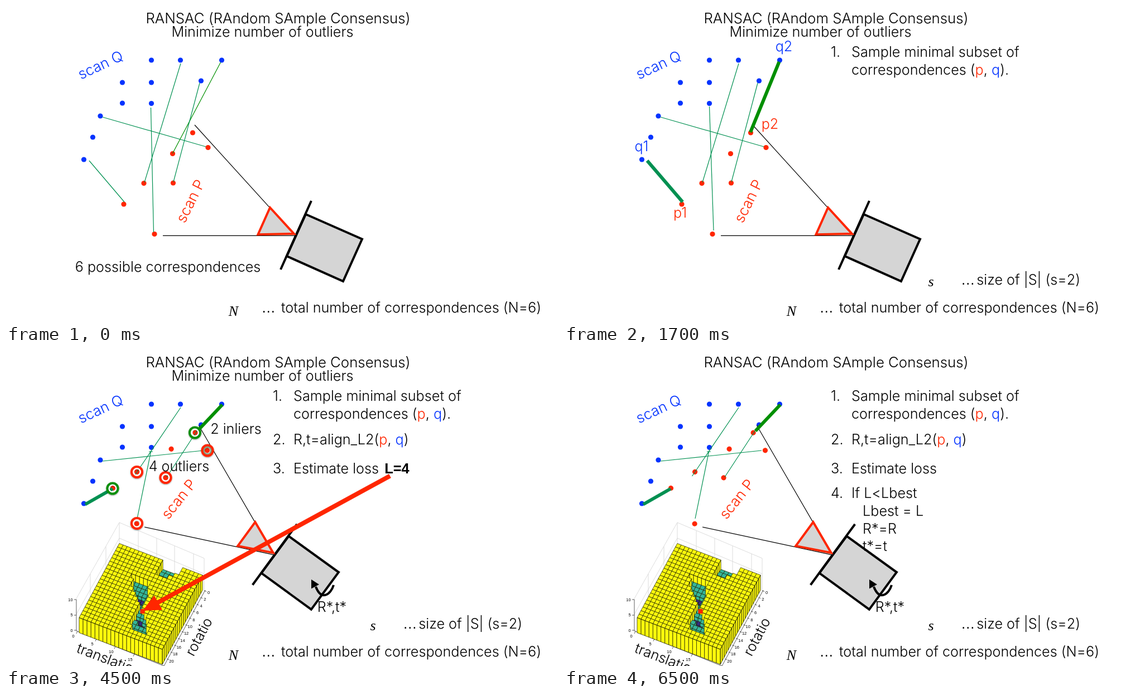
An HTML page for the animation above (8000 ms loop, 989 by 566 pixels).

```html
<!DOCTYPE html>
<html lang="en">
<head>
<meta charset="utf-8">
<title>RANSAC</title>
<style>
html, body { margin: 0; width: 100%; height: 100%; overflow: hidden; background: #fff; }
svg { display: block; width: 989px; height: 566px; }
text {
  font: 300 25.2px Inter, "Open Sans", sans-serif;
  font-optical-sizing: none; font-feature-settings: "calt" 0;
  fill: #000; white-space: pre;
}
text.title { font-size: 25.8px; }
text.scan { font-size: 26.2px; }
text.math { font: italic 26px "Liberation Serif", serif; }
text.tick { font: 7.5px "Liberation Sans", sans-serif; }
text.more { font: 25.5px "Liberation Sans", sans-serif; }
.bold { font: bold 25.4px "Liberation Sans", sans-serif; }
.red { fill: #ff2600; }
.blue { fill: #0433ff; }
</style>
</head>
<body>
<svg id="stage" viewBox="0 0 989 566">
  <defs>
    <filter id="shade" x="-30%" y="-30%" width="160%" height="170%">
      <feDropShadow dx="0" dy="1" stdDeviation="1" flood-opacity=".4"/>
    </filter>
  </defs>
</svg>
<script>
const RED = '#ff2600', BLUE = '#0433ff', SEA = '#009051', GREEN = '#008f00';
const STARTS = [0, 500, 2500, 4500, 6500], LOOP = 8000;
const stage = document.getElementById('stage');
const staged = [];

function add(parent, tag, attrs, html) {
  const el = document.createElementNS('http://www.w3.org/2000/svg', tag);
  for (const k in attrs) el.setAttribute(k, attrs[k]);
  if (html !== undefined) el.innerHTML = html;
  parent.appendChild(el);
  return el;
}
// A group that is visible only during the listed steps.
function layer(steps) {
  const el = add(stage, 'g', {});
  staged.push({ el, steps });
  return el;
}
const text = (g, x, y, s, attrs = {}) => add(g, 'text', { x, y, ...attrs }, s);
const path = (g, d, stroke, width, fill = 'none') =>
  add(g, 'path', { d, stroke, 'stroke-width': width, fill });
const dots = (g, list, fill) =>
  list.forEach(([cx, cy]) => add(g, 'circle', { cx, cy, r: 4.6, fill }));
const tilted = (g, x, y, angle, s, attrs = {}) =>
  add(g, 'text', { transform: `translate(${x} ${y}) rotate(${angle})`, ...attrs }, s);
const MID = { 'text-anchor': 'middle' }, END = { 'text-anchor': 'end' };

// Loss surface as a 3D bar chart
const CELLS = 21, UNIT = 5.4;

function barHeight(i, j) {
  const notchEnd = [15, 15, 14, 13][j];
  if (i >= 11 && i <= notchEnd) return j ? 2.3 : 1.9;
  if (j < 6 || j > 18) return 5;
  // An hourglass valley, narrowest at row 12, with a deep core in each half.
  const off = Math.abs(i - 8 - (j - 6) * 0.47);
  const away = Math.abs(j - 12);
  if (off > 0.6 + 0.42 * Math.min(away, 4)) return 5;
  return off < 0.9 && (away === 2 || away === 3) ? 1.6 : 2.7;
}

function drawPlot(g) {
  const point = (i, j, h) =>
    `${(203 + i * 7.1 - j * 3.43).toFixed(1)} ${(346.5 + i * 2.7 + j * 6.33 + (5 - h) * UNIT).toFixed(1)}`;
  path(g, 'M125 447L203 309L355 373M203 309V347M237 324V360M270 337V374M302 351V400M336 365V400' +
    'M355 373V430M125 475L203 337L355 401M179 352V392M151 401V442', '#d4d4d4', 0.8);
  path(g, 'M126 447V503L283 566L357 430M122 447h4M122 475h4M122 502h4', '#333', 0.8);
  for (let j = 0; j < CELLS; j++) for (let i = 0; i < CELLS; i++) {
    const h = barHeight(i, j), I = i + 1, J = j + 1;
    const fill = h > 4 ? '#fffb0c' : h > 1.8 ? '#35b59b' : '#352a87';
    const face = (...p) => 'M' + p.join('L') + 'Z';
    let d = '';
    if (J === CELLS || barHeight(i, J) < h)
      d += face(point(i, J, h), point(I, J, h), point(I, J, 0), point(i, J, 0));
    if (I === CELLS || barHeight(I, j) < h)
      d += face(point(I, j, h), point(I, J, h), point(I, J, 0), point(I, j, 0));
    d += face(point(i, j, h), point(I, j, h), point(I, J, h), point(i, J, h));
    path(g, d, '#222400', 0.75, fill);
  }
  const tick = (x, y, n) => text(g, x, y, n, { class: 'tick', ...MID });
  for (let k = 0; k < 3; k++) tick(k === 2 ? 115.5 : 117.5, 504.5 - k * 27.3, k * 5);
  for (let k = 0; k < 4; k++) {
    tick(120.5 + k * 34, 515 + k * 14, k * 5);
    path(g, `M${128 + k * 34} ${504 + k * 13.6}l-2 4`, '#333', 0.8);
  }
  for (let k = 0; k <= 10; k++) {
    tick(363 - k * 6.65, 436.5 + k * 12.3, k * 2);
    path(g, `M${355 - k * 6.7} ${431 + k * 12.2}l4 1.6`, '#333', 0.8);
  }
  tilted(g, 125, 541, 21, 'translation');
  tilted(g, 336, 550, -62, 'rotatio');
  add(g, 'rect', { x: 240.5, y: 464, width: 8, height: 8, fill: RED });
}
drawPlot(layer([3, 4]));

// Fixed scan
dots(stage, [[260.5, 97], [312.5, 97], [386.5, 97], [349.5, 134], [208.5, 137], [260.5, 137],
  [208.5, 174], [260.5, 174.5], [169, 197], [155.5, 235], [139.5, 275]], BLUE);
tilted(stage, 173, 114, -25, 'scan Q', { class: 'scan blue', ...MID });

// Robot with its own scan, moved as one rigid body
const robot = add(stage, 'g', {});
path(robot, 'M338 213L516 409M281 411.3H518', '#000', 1.2);
path(robot, 'M537 373L638 417.5L604 493L503 448Z', '#000', 4, '#d5d5d5');
path(robot, 'M547 349L492 472', '#000', 4);
path(robot, 'M473 361L451.5 409.3L516 408Z', RED, 4, '#d5d5d5');
dots(robot, [[334.5, 227], [362, 253.5], [298.5, 264.5], [247, 317.5], [299.5, 317],
  [211, 355], [266, 408.5]], RED);
tilted(robot, 338.5, 353.5, -63.5, 'scan P', { class: 'scan red', ...MID });

// Correspondences
const first = layer([0]), sample = layer([1]), before = layer([0, 1]), after = layer([2, 3, 4]);
path(before, 'M313 103L248 316M347 138L300 315M173 199L358 252', SEA, 1.2);
path(first, 'M149 277L212 351M259.5 182L264.5 405', SEA, 1.2);
path(first, 'M384.5 101L298.5 264', GREEN, 1.2);
path(sample, 'M260.5 180L268 402', SEA, 1.2);
path(sample, 'M149 277L212.5 351', SEA, 6);
path(sample, 'M385.5 100L334 226', GREEN, 6);
path(after, 'M313 103L229.5 226M346 139L288 227.5M173 199L354 180M260 180L235 302M256 182H263', SEA, 1.2);
path(after, 'M142 276.5L191 248.5', SEA, 6);
path(after, 'M387.5 98L343 145', GREEN, 6);

text(sample, 394, 81, 'q2', { class: 'blue', ...MID });
text(sample, 369, 220, 'p2', { class: 'red', ...MID });
text(sample, 139, 260, 'q1', { class: 'blue', ...MID });
text(sample, 208, 379, 'p1', { class: 'red', ...MID });

// Turning arrow beside the robot
path(after, 'M587 421C582 438 565 450 555 424', '#000', 4);
path(after, 'M547 411L561 420L547 427.5Z', 'none', 0, '#000');
text(layer([2]), 584, 470, 'R,t', MID);
text(layer([3, 4]), 584, 469, 'R*,t*', MID);

// Inliers and outliers
const loss = layer([3]);
const rings = add(loss, 'g', { filter: 'url(#shade)' });
function ring(cx, cy, color, inner = '#fff') {
  add(rings, 'circle', { cx, cy, r: 6.6, fill: 'none', stroke: inner, 'stroke-width': 2.6 });
  add(rings, 'circle', { cx, cy, r: 9.6, fill: 'none', stroke: color, 'stroke-width': 4 });
}
[[191, 248], [338.5, 148]].forEach(([x, y]) => ring(x, y, '#0a8f0a'));
[[234.5, 218.5], [286, 228.5], [234.5, 310.5]].forEach(([x, y]) => ring(x, y, RED));
ring(361, 180, RED, '#7f9f83');
text(loss, 412, 150, '2 inliers', MID);
text(loss, 310, 216.5, '4 outliers', MID);

// Captions
text(stage, 487.5, 30.5, 'RANSAC (RAndom SAmple Consensus)', { class: 'title', ...MID });
text(layer([0, 1, 2, 3]), 459.5, 55, 'Minimize number of outliers', MID);
text(first, 290, 476, '6 possible correspondences', MID);
text(stage, 407.5, 555, 'N', { class: 'math', ...MID });
text(stage, 457.5, 549, '…', { class: 'more' });
text(stage, 959, 549, 'total number of correspondences (N=6)', END);

const pair = '(<tspan class="red">p</tspan>, <tspan class="blue">q</tspan>)';
function item(g, n, y, ...lines) {
  text(g, 478, y, n + '.');
  lines.forEach((s, k) => text(g, n === 4 && k ? 535 : 515, y + k * 31.8, s));
}
const one = layer([1, 2, 3, 4]);
item(one, 1, 91, 'Sample minimal subset of', `correspondences ${pair}.`);
text(one, 657.5, 501.5, 's', { class: 'math', ...MID });
text(one, 711, 499, '…', { class: 'more' });
text(one, 925, 499, 'size of |S| (s=2)', END);
item(after, 2, 169, `R,t=align_L2${pair}`);
item(layer([3, 4]), 3, 221, 'Estimate loss');
item(layer([4]), 4, 265, 'If L&lt;Lbest', 'Lbest = L', 'R*=R', 't*=t');
text(loss, 700.5, 221, 'L=4', { class: 'bold', ...MID });

path(loss, 'M688 225.5L268 454.5', RED, 8);
path(loss, 'M245 467L265.5 439.5L280 465.5Z', 'none', 0, RED);

function update(time) {
  const t = time % LOOP;
  const step = STARTS.filter(s => s <= t).length - 1;
  for (const { el, steps } of staged)
    el.setAttribute('display', steps.includes(step) ? 'inline' : 'none');
  robot.setAttribute('transform', step < 2 ? ''
    : 'translate(526.75 398.8) rotate(12.1) translate(-570.5 -432.75)');
}

const begin = performance.now();
function tick() {
  update(performance.now() - begin);
  requestAnimationFrame(tick);
}
tick();
</script>
</body>
</html>
```
